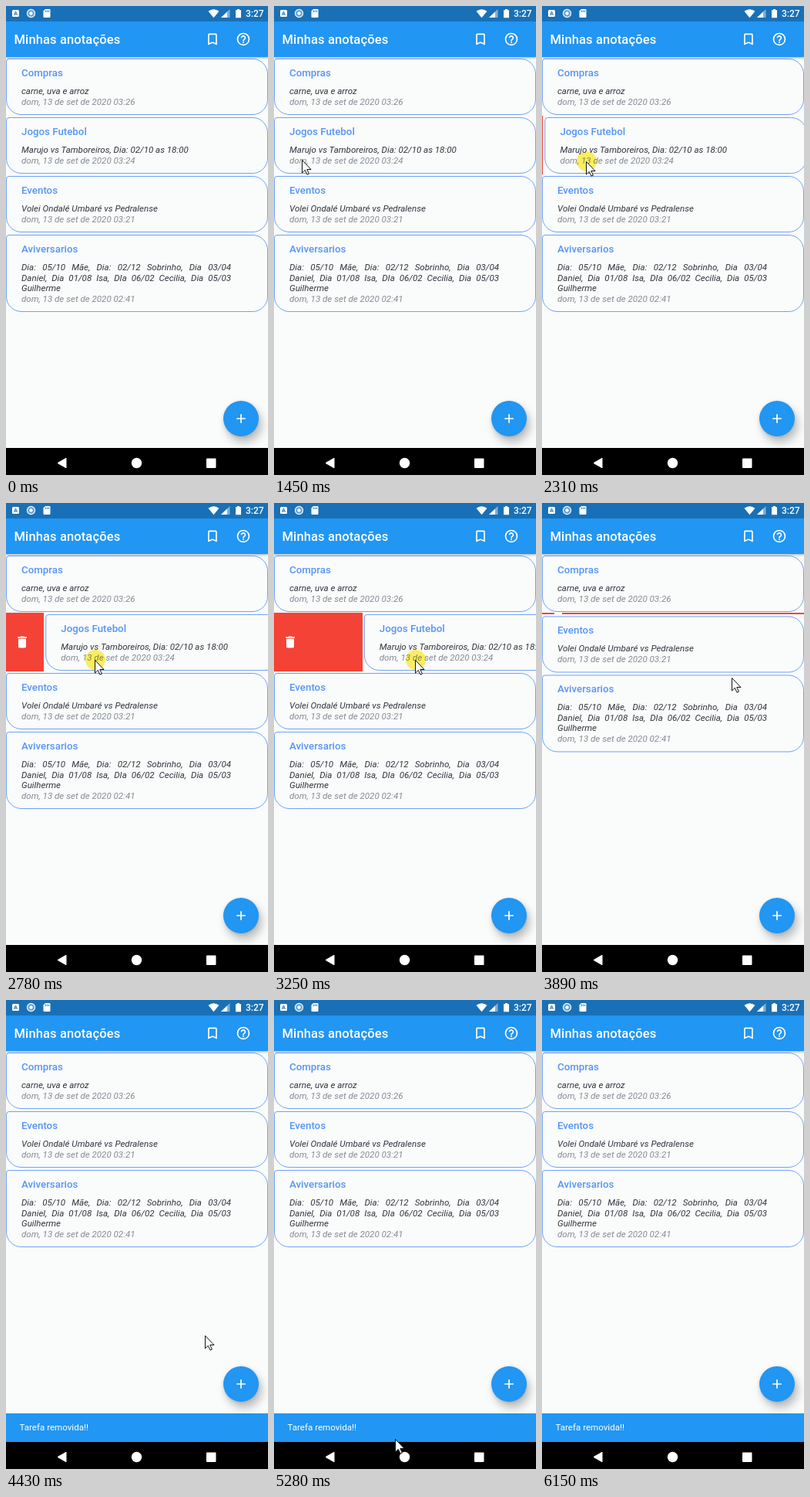
Animation, 340 px wide and 607 px high, one loop 6700 ms. Source, as an HTML page:

```html
<!DOCTYPE html>
<html lang="pt">
<head>
<meta charset="utf-8">
<title>Minhas anotações</title>
<style>
html, body { margin: 0; width: 100%; height: 100%; overflow: hidden; background: #fafbfb; }
body { font-family: Roboto, sans-serif; }
:where(div, svg) { position: absolute; left: 0; top: 0; white-space: nowrap; }
#stage { width: 340px; height: 607px; overflow: hidden; background: #fafbfb; }
#page { width: 340px; height: 572px; overflow: hidden; }
#status { width: 340px; height: 20px; background: #1970b6; }
#bar { top: 20px; width: 340px; height: 46px; background: #2196f3; box-shadow: 0 1px 3px rgba(0,0,0,.35); }
#bar div { left: 10.5px; top: 12px; font: 500 16.54px/24px Roboto, sans-serif; letter-spacing: .1px; color: #fff; }
.card { width: 338px; border: 1px solid #6ea2f7; border-radius: 4px 20px 20px 20px; background: #fafbfb; }
.card div { left: 19px; width: 272px; font: italic 400 11.57px/14px Roboto, sans-serif; color: #30353d; }
.card .head { font: 500 13.3px/18px Roboto, sans-serif; color: #5595f7; }
.card .date { color: #868b93; }
.card .full { text-align: justify; text-align-last: justify; white-space: normal; }
#bin { top: 142px; background: #f44336; overflow: hidden; }
#can { left: 11px; }
#fab { left: 282px; width: 46px; height: 46px; border-radius: 50%; background: #2196f3;
  box-shadow: 4px 8px 12px rgba(0,0,0,.25), 0 1px 4px rgba(0,0,0,.12); }
#snack { width: 340px; height: 38px; background: #2196f3; }
#snack div { left: 17.5px; top: 11px; font: 400 11.57px/14px Roboto, sans-serif; color: #fff; }
#nav { top: 572px; background: #000; }
#spot { width: 26px; height: 26px; border-radius: 50%; background: #fff163; mix-blend-mode: multiply; }
</style>
</head>
<body>
<div id="stage">
  <div id="page">
    <div id="bin"><svg id="can" width="20" height="20" viewBox="0 0 24 24" fill="#fff">
      <path d="M6 19c0 1.1.9 2 2 2h8c1.1 0 2-.9 2-2V7H6v12zM19 4h-3.5l-1-1h-5l-1 1H5v2h14V4z"/></svg></div>
    <div id="list"></div>
    <div id="snack"><div>Tarefa removida!!</div></div>
    <div id="fab"><svg width="46" height="46" stroke="#fff" stroke-width="1.7"><path d="M17.2 23H28.8M23 17.2V28.8"/></svg></div>
    <div id="bar"><div>Minhas anotações</div></div>
    <div id="status"></div>
    <svg width="340" height="66" fill="#fff">
      <rect x="8" y="5" width="9" height="9" rx="1.5"/>
      <path d="M10.5 12L12.5 7L14.5 12M11.3 10.4H13.7" fill="none" stroke="#1970b6"/>
      <circle cx="32.5" cy="9.5" r="5" fill="#5a9fd6" stroke="#e4f0fa" stroke-width="1.4"/>
      <circle cx="32.5" cy="9.5" r="2.2"/>
      <path d="M51 4H56.5Q57.5 4 57.5 5V14Q57.5 15 56.5 15H49.5Q48.5 15 48.5 14V6.5Z"/>
      <path d="M51.5 5.5V8M53.5 5.5V8M55.5 5.5V8" stroke="#1970b6" stroke-width=".9"/>
      <path d="M262.5 6.8Q269.5 1.7 276.5 6.8L269.5 15.2Z"/>
      <path d="M279 15L290.5 4V15Z" opacity=".45"/><path d="M279 15L287 7.4V15Z"/>
      <path d="M298 5.2H300V4H303V5.2H305V15.2H298Z"/>
      <text x="311" y="14" font-family="Roboto, sans-serif" font-size="12" font-weight="500">3:27</text>
      <path transform="translate(258 33) scale(.83)" d="M17 3H7c-1.1 0-1.99.9-1.99 2L5 21l7-3 7 3V5c0-1.1-.9-2-2-2zm0 15l-5-2.18L7 18V5h10v13z"/>
      <g transform="translate(298 33) scale(.83)">
        <circle cx="12" cy="12" r="9" fill="none" stroke="#fff" stroke-width="2"/>
        <path d="M11 16h2v2h-2zM12 6c-2.2 0-4 1.8-4 4h2c0-1.1.9-2 2-2s2 .9 2 2c0 2-3 1.75-3 5h2c0-2.25 3-2.5 3-5 0-2.2-1.8-4-4-4z"/>
      </g>
    </svg>
  </div>
  <svg id="nav" width="340" height="35" fill="#fff">
    <path d="M67 19.5L78 13.2V25.8Z" stroke="#fff" stroke-linejoin="round"/>
    <circle cx="169.500" cy="19.500" r="6.700"/>
    <rect x="260" y="13.500" width="12.500" height="12.500" rx="1"/>
  </svg>
  <div id="spot"></div>
  <svg id="cursor" width="14" height="21" viewBox="-.5 -.5 14 21" fill="#fff" stroke="#111">
    <path d="M0 0V16.5L3.8 12.9L6.5 18.7L8.9 17.6L6.3 12H11.5Z"/></svg>
</div>
<script>
const $ = id => document.getElementById(id);
const LOOP = 6700, ROW = 76, SNACK = 37;
const ENTER = 380, PRESS = 1920, DRAG = 2160, RELEASE = 3500, LEAVE = 6140;

const notes = [
  ['Compras', ['carne, uva e arroz'], '03:26'],
  ['Jogos Futebol', ['Marujo vs Tamboreiros, Dia: 02/10 as 18:00'], '03:24'],
  ['Eventos', ['Volei Ondalé Umbaré vs Pedralense'], '03:21'],
  ['Aviversarios', ['Dia: 05/10 Mãe, Dia: 02/12 Sobrinho, Dia 03/04',
    'Daniel, Dia 01/08 Isa, DIa 06/02 Cecilia, Dia 05/03', 'Guilherme'], '02:41']
];

function add(parent, cls, text, top) {
  const el = document.createElement('div');
  el.className = cls;
  el.textContent = text;
  el.style.top = top + 'px';
  return parent.appendChild(el);
}

const cards = notes.map(([head, lines, hour], i) => {
  const card = add($('list'), 'card', '', 68 + ROW * i);
  const y = n => 34 + Math.round(13.5 * n);
  add(card, 'head', head, 9);
  lines.forEach((s, n) => add(card, n < lines.length - 1 ? 'full' : '', s, y(n)));
  add(card, 'date', 'dom, 13 de set de 2020 ' + hour, y(lines.length));
  card.style.height = Math.floor(57.5 + 13.5 * lines.length) + 'px';
  return card;
});

// pointer stops: time, x, y
const stops = [
  [380, 295, 595], [990, 98, 300], [1450, 36, 199], [DRAG, 38, 200], [2780, 114, 203],
  [RELEASE, 218, 203], [3885, 246, 226], [4200, 235, 297], [4430, 258, 435],
  [4890, 278, 556], [5300, 153, 568], [5590, 168, 560], [6150, 312, 606]
];

const ramp = (t, a, b) => Math.max(0, Math.min(1, (t - a) / (b - a)));
const easeOut = p => 1 - (1 - p) ** 2;
const show = (el, on) => { el.style.visibility = on ? 'visible' : 'hidden'; };
const move = (el, x, y) => { el.style.transform = `translate(${x}px, ${y}px)`; };

function stepTime(t) {
  const [from, step] = t < DRAG ? [ENTER, 76.4] : [DRAG, 78.2];
  return from + Math.floor((t - from + 10) / step) * step;
}

function pointer(t) {
  const i = stops.findIndex(s => s[0] >= t);
  if (i < 1) return stops[i ? stops.length - 1 : 0].slice(1);
  const a = stops[i - 1], b = stops[i], p = ramp(t, a[0], b[0]);
  return [1, 2].map(k => Math.round(a[k] + (b[k] - a[k]) * p));
}

// the card trails the pointer, then is flung off to the right
function cardShift(t) {
  const u = Math.max(0, Math.min(t, RELEASE) - 2275);
  const held = u * (.08 + .00004 * u);
  return held + (342 - held) * ramp(t, RELEASE, 3650);
}

function draw(ms) {
  const t = stepTime(ms % LOOP);
  const [x, y] = pointer(t);
  const dx = cardShift(t);
  const gap = ROW * (1 - easeOut(ramp(t, 3700, 3920)));
  const up = SNACK * easeOut(ramp(t, 3930, 4180));

  move(cards[1], dx, 0);
  show(cards[1], dx < 340);
  move(cards[2], 0, gap - ROW);
  move(cards[3], 0, gap - ROW);
  $('bin').style.width = Math.max(0, Math.min(340, dx - 2)) + 'px';
  $('bin').style.height = gap + 'px';
  $('can').style.top = gap / 2 - 10 + 'px';

  move($('fab'), 0, 511 - up);
  move($('snack'), 0, 572 - up);

  show($('cursor'), t >= ENTER && t < LEAVE);
  move($('cursor'), x, y);
  show($('spot'), t >= PRESS - 20 && t <= RELEASE);
  move($('spot'), x - 12, y - 13);
}

const start = performance.now();
function tick() {
  draw(performance.now() - start);
  requestAnimationFrame(tick);
}
tick();
</script>
</body>
</html>
```
